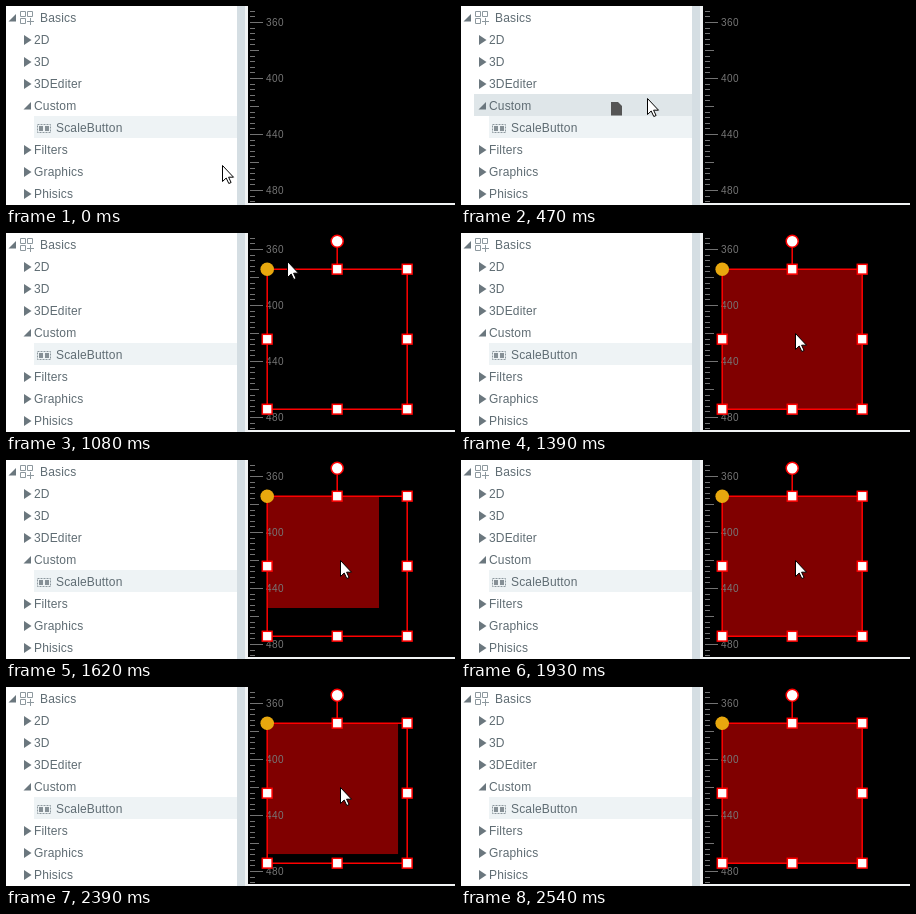
Write an HTML page that moves like this. It is 449 by 199 pixels and loops after 2.94 s.

```html
<!DOCTYPE html>
<html lang="en">
<head>
<meta charset="utf-8">
<title>Scale button demo</title>
<style>
  html, body { margin: 0; width: 100%; height: 100%; overflow: hidden; background: #fff; }
  svg { display: block; }
  text { font-family: "Liberation Sans", Arial, sans-serif; }
  .tree text { font-size: 12px; letter-spacing: .16px; fill: #5f6c73; }
  .tree path { fill: #6b777e; }
  .tree .icon path { fill: none; }
  .ruler text { font-size: 10px; letter-spacing: .5px; fill: #767676; }
  .ruler rect { fill: #737373; }
  .handles { fill: #fff; stroke: #f00; stroke-width: 1.5; }
</style>
</head>
<body>
<svg id="stage" width="449" height="199" viewBox="0 0 449 199">
  <rect width="449" height="199" fill="#fff"/>
  <rect x="231" width="8" height="199" fill="#d5dee3"/>
  <rect x="239" width="210" height="199" fill="#f1f3f4"/>
  <rect x="242" width="207" height="197" fill="#000"/>
  <rect x="28" y="110" width="203" height="22" fill="#eef3f5"/>
  <rect id="hover" x="13" width="218" height="22" fill="#dfe6e9"/>
  <g id="tree" class="tree">
    <g class="icon" fill="none" stroke="#8d989e">
      <path d="M14.5 5.5h5v5h-5zM21.5 5.5h5v5h-5zM14.5 12.5h5v5h-5zM21 15.5h7M24.5 12v7"/>
      <rect x="31.5" y="118.5" width="13" height="8" stroke-dasharray="2 1"/>
    </g>
    <path d="M33 120h4v5h-4zM39 120h4v5h-4z" opacity=".8"/>
  </g>
  <rect id="button" x="261" y="36" fill="#800000"/>
  <g id="ruler" class="ruler"></g>
  <g id="selection">
    <path d="M261.2 36.2h140v140h-140zM331.2 8v28" fill="none" stroke="#f00" stroke-width="1.5"/>
    <g id="handles" class="handles"><circle cx="331.2" cy="8.2" r="6"/></g>
    <circle cx="261.2" cy="36.2" r="6.8" fill="#e8a80e"/>
  </g>
  <path id="ghost" d="M0 0h7l4 4v9.5H0z" fill="#555"/>
  <path id="cursor" d="M.5.5v16l3.7-3.5 2.6 5.5 2.3-1-2.5-5.3h4.9z" fill="#fff" stroke="#000"/>
</svg>
<script>
const LOOP = 2940, STEP = 77, ROW = 22, SIZE = 140;
const $ = id => document.getElementById(id);

function add(parent, tag, attrs, label) {
  const el = document.createElementNS("http://www.w3.org/2000/svg", tag);
  for (const key in attrs) el.setAttribute(key, attrs[key]);
  if (label) el.textContent = label;
  $(parent).append(el);
}

const rows = ["Basics", "2D", "3D", "3DEditer", "Custom", "ScaleButton", "Filters", "Graphics", "Phisics"];
rows.forEach((name, i) => {
  const mid = 12 + i * ROW;
  const open = name === "Basics" || name === "Custom";
  const leaf = name === "ScaleButton";
  const x = i ? 18 : 3;
  add("tree", "text", { x: leaf ? 50 : i ? 28 : 34, y: mid + 4 }, name);
  if (open) add("tree", "path", { d: `M${x + 7} ${mid - 4}v7.5h-7.5z` });
  else if (!leaf) add("tree", "path", { d: `M${x} ${mid - 5}v10l7.5-5z` });
});

for (let i = -2; i <= 32; i++) {
  const y = Math.round(16 + i * 5.6), major = i % 10 === 0;
  add("ruler", "rect", { x: 244, y, width: major ? 13 : i % 5 ? 5 : 9, height: 1 });
  if (major) add("ruler", "text", { x: 260, y: y + 4 }, 360 + i * 4);
}

// Eight grips around the selection; the top-left one is the pivot dot
for (let i = 1; i < 9; i++) {
  if (i === 4) continue;
  const x = 261.2 + (i % 3) * SIZE / 2, y = 36.2 + Math.floor(i / 3) * SIZE / 2;
  add("handles", "rect", { x: x - 4.9, y: y - 4.9, width: 9.8, height: 9.8 });
}

const clamp = v => Math.max(0, Math.min(1, v));
const smooth = p => p * p * (3 - 2 * p);
const easeOut = p => 1 - (1 - p) ** 2;

// The screen refreshes in whole steps after each action starts
const stepsSince = (start, t) => Math.floor((t - start + 4) / STEP);

const moves = [
  { start: 0, steps: 4, from: [216, 159], to: [105, 118], ease: smooth },
  { start: 470, steps: 6, from: [186, 92], to: [275, 22], ease: easeOut },
  { start: 1080, steps: 4, from: [281, 28], to: [334, 100], ease: smooth },
  { start: 2470, steps: 1, from: [351, 182], to: [351, 220], ease: smooth }
];

function cursorAt(t) {
  const { start, steps, from, to, ease } = moves.findLast(m => m.start <= t);
  const p = ease(clamp(stepsSince(start, t) / steps));
  return from.map((v, i) => Math.round(v + (to[i] - v) * p));
}

// Alternating press and release
const clicks = [1540, 1850, 2160, 2390];

function scaleAt(t) {
  if (t < 1160) return 0;
  const i = clicks.findLastIndex(c => c <= t);
  if (i < 0) return 1;
  const p = clamp(.68 + stepsSince(clicks[i], t));
  return i % 2 ? .8 + .2 * p : 1 - .2 * p;
}

const show = (id, on) => $(id).setAttribute("visibility", on ? "visible" : "hidden");
const move = (id, x, y) => $(id).setAttribute("transform", `translate(${x} ${y})`);

function draw(t) {
  const [x, y] = cursorAt(t);
  const size = SIZE * scaleAt(t);
  const dragging = t >= 470 && t < 930;

  move("cursor", x, y);
  show("cursor", t < 2540);
  move("ghost", x - 36, y + 4);
  show("ghost", dragging);
  $("hover").setAttribute("y", Math.floor(y / ROW) * ROW);
  show("hover", dragging && x < 231);
  show("selection", t >= 1080);
  $("button").setAttribute("width", size);
  $("button").setAttribute("height", size);
}

const start = performance.now();
function tick() {
  draw((performance.now() - start) % LOOP);
  requestAnimationFrame(tick);
}
draw(0);
requestAnimationFrame(tick);
</script>
</body>
</html>
```
